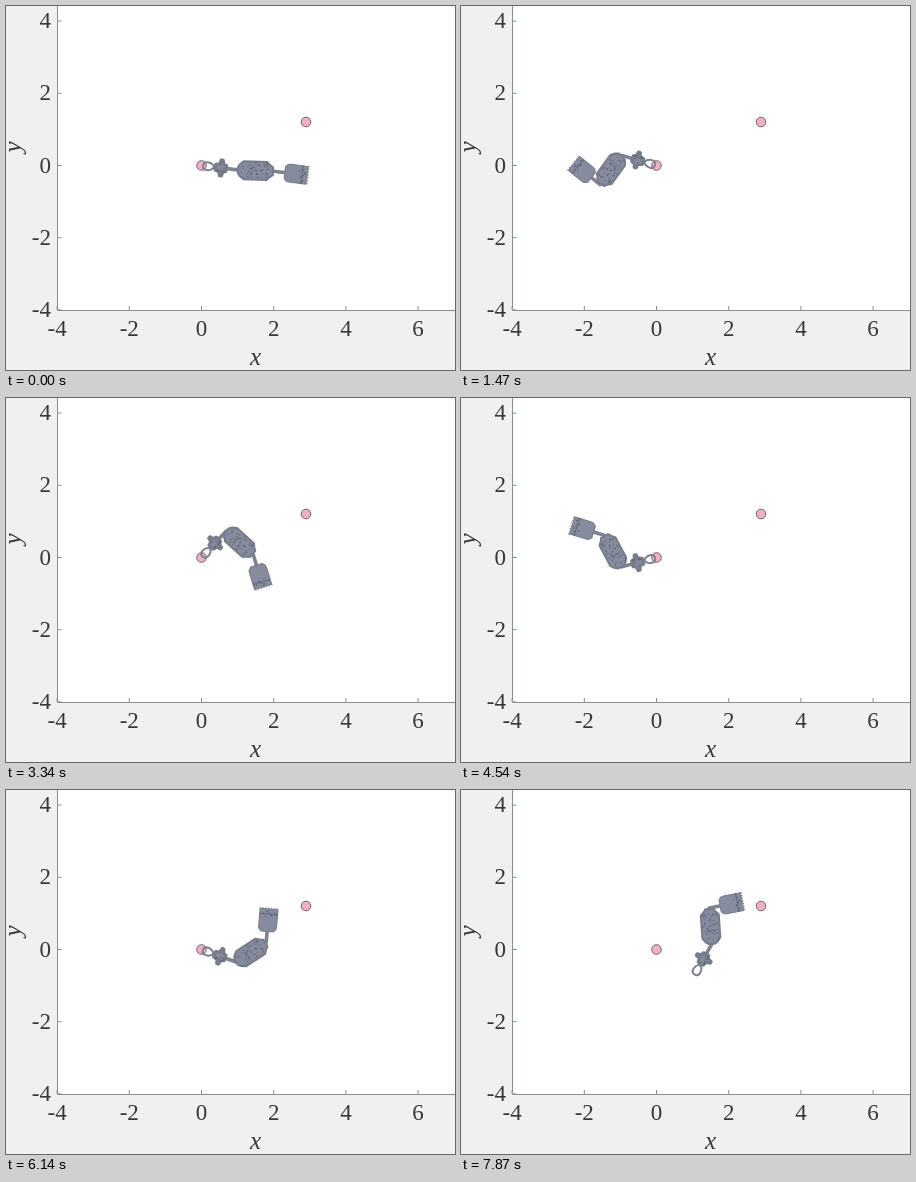
An HTML page for the animation above (8 s loop, 449 px wide and 364 px high).

```html
<!DOCTYPE html>
<html lang="en">
<head>
<meta charset="utf-8">
<title>Swinging chain</title>
<style>
html, body { margin: 0; width: 100%; height: 100%; overflow: hidden; background: #f0f0f0; }
svg { display: block; width: 100vw; height: 100vh; }
text { font-family: "Liberation Serif", "Times New Roman", serif; font-size: 23px; fill: #383838; }
.name { font-size: 25px; font-style: italic; text-anchor: middle; }
.axis { fill: none; stroke: #87908d; }
.dot { fill: #f0b0c8; stroke: #6b6570; }
.part { fill: #868c9d; stroke: #777c8b; stroke-linejoin: round; }
.rod { fill: none; stroke: #7d8392; stroke-linecap: round; }
.speck { stroke: #565b69; stroke-width: 1.2; opacity: .8; }
</style>
</head>
<body>
<svg viewBox="0 0 449 364">
  <rect width="449" height="364" fill="#f0f0f0"/>
  <rect x="51" width="398" height="304" fill="#fff"/>
  <g id="axes"></g>
  <text class="name" x="249.5" y="359">x</text>
  <text class="name" transform="translate(14.5 141) rotate(-90)">y</text>
  <circle class="dot" cx="195.5" cy="159.5" r="4.8"/>
  <circle class="dot" cx="300" cy="116" r="4.8"/>
  <g id="leg">
    <path class="rod" stroke-width="3.6" d="M0 0H12"/>
    <path class="part" d="M11 -6L13.5 -8.5L16 -9H33.5V9H16L13.5 8.5L11 6Z"/>
    <path class="speck" d="M28.5 -9V9" stroke-dasharray="2.5 1"/>
    <path d="M34.3 -9.5V9.5" stroke="#8a8794" stroke-width="1.6" stroke-dasharray="1 1.8"/>
  </g>
  <g id="arm">
    <path class="rod" stroke-width="2" d="M13 0C9 -5.5 1.5 -5 1.5 0S9 5.5 13 0"/>
    <path class="rod" stroke-width="3.6" d="M13 0H36"/>
    <path class="part" stroke-width="3" d="M14 -3L18 -4L19 -8H21L22 -4L25 -3V3L22 4L21 8H19L18 4L14 3Z"/>
  </g>
  <g id="body">
    <path class="part" stroke-width="2" d="M0 -3L2 -6L6 -9H29L32 -6L35 -4V4L32 6L29 9H6L2 6L0 3Z"/>
  </g>
</svg>
<script>
const LOOP = 8000, UNIT = 36.1, OX = 195.5, OY = 159.5;
const TICK = 1000 / 15, TICKS_PER_STEP = 1.5138;
const REACH = { arm: 36.7, body: 36, leg: 0 };
const RELEASE = 76.3, LAST = 78;
const get = id => document.getElementById(id);

// turning points: step, then the angles of arm, body and leg in degrees
const poses = [
  [0, 7, 2, 7], [7, 88, 90, 86], [14, 196, 126, 219], [22, 115, 105, 108],
  [25, 76, 30, -5], [33, -47, 42, 73], [39, 40, 85, 115], [42, 140, 205, 150],
  [45, 165, 242, 197], [51, 140, 225, 170], [59, 38, 0, 15], [61, 20, -33, -85],
  [65, -50, -130, -160], [69, -137, -186, -104], [76, -325, -355, -320],
  [LAST, -421, -454, -371]
];

// steps of about 101 ms, each shown from the nearest tick of a 15 Hz clock
function stepAt(t) {
  const tick = Math.floor(t / TICK + 0.1);
  return Math.floor((tick + 0.445) / TICKS_PER_STEP);
}

function slope(i, k) {
  if (i === 0) return 0;
  const a = poses[i - 1], b = poses[Math.min(i + 1, poses.length - 1)];
  return (b[k] - a[k]) / (b[0] - a[0]);
}

function angle(n, k) {
  const next = poses.findIndex(p => p[0] > n);
  const i = (next < 0 ? poses.length - 1 : next) - 1;
  const a = poses[i], b = poses[i + 1], w = b[0] - a[0];
  const s = Math.min((n - a[0]) / w, 1), r = 1 - s;
  return a[k] * r * r * (1 + 2 * s) + b[k] * s * s * (3 - 2 * s)
    + w * s * r * (slope(i, k) * r - slope(i + 1, k) * s);
}

function draw(n) {
  const s = Math.min(Math.max((n - RELEASE) / (LAST - RELEASE), 0), 1);
  let x = OX + 37.5 * s ** 3, y = OY + 26.5 * s * (2 - s);
  Object.keys(REACH).forEach((id, i) => {
    const deg = angle(n, i + 1), rad = deg * Math.PI / 180;
    get(id).setAttribute("transform", `translate(${x} ${y}) rotate(${deg})`);
    x += REACH[id] * Math.cos(rad);
    y += REACH[id] * Math.sin(rad);
  });
}

function axes() {
  let marks = "M51.5 0V304.5H449", labels = "";
  for (let v = -4; v <= 6; v += 2) {
    const x = OX + v * UNIT, y = OY - v * UNIT;
    marks += `M${x} 304v-4`;
    labels += `<text x="${x}" y="330" text-anchor="middle">${v}</text>`;
    if (v > 4) continue;
    marks += `M51.5 ${y}h4`;
    labels += `<text x="45" y="${y + 7}" text-anchor="end">${v}</text>`;
  }
  get("axes").innerHTML = `<path class="axis" d="${marks}"/>${labels}`;
}

let seed = 7;
const rand = () => (seed = seed * 16807 % 2147483647) / 2147483647;

function speckle(id, count, x, y, w, h) {
  let d = "";
  for (let i = 0; i < count; i++) d += `M${x + rand() * w} ${y + rand() * h}h${0.8 + rand()}`;
  get(id).insertAdjacentHTML("beforeend", `<path class="speck" d="${d}"/>`);
}

axes();
speckle("body", 44, 3, -8, 28, 16);
speckle("arm", 10, 15, -5, 8, 10);
speckle("leg", 12, 25, -8, 7, 16);

const begin = performance.now();
function tick() {
  draw(stepAt((performance.now() - begin) % LOOP));
  requestAnimationFrame(tick);
}
tick();
</script>
</body>
</html>
```
